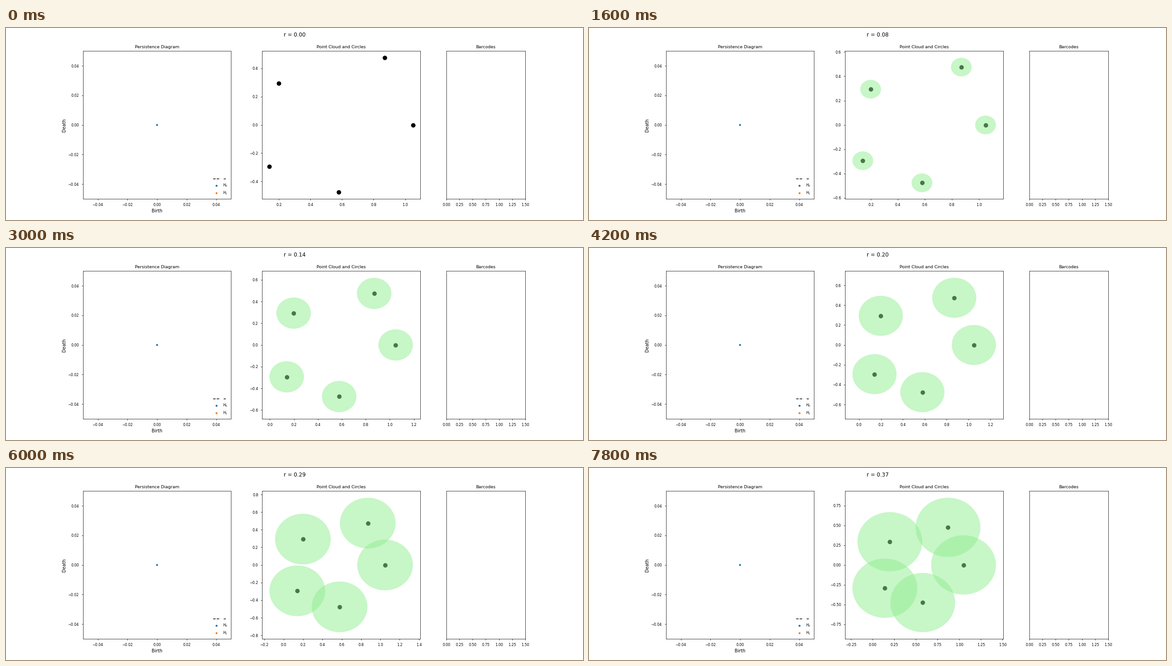
Recreate the animation shown at these times as a matplotlib script. Size 1280 by 427 pixels, loop 8000 ms.

```python
import numpy as np
import matplotlib.pyplot as plt
from matplotlib.animation import FuncAnimation
from matplotlib.patches import Circle

W, H = 1280, 427
DPI = W / 18
FRAMES, INTERVAL = 40, 200
GROWTH = 0.0096  # radius gained per frame
MARGIN = 0.05

plt.rcParams.update({
    "font.family": "DejaVu Sans",
    "axes.titlesize": 9.6,
    "axes.labelsize": 10,
    "xtick.labelsize": 8,
    "ytick.labelsize": 8,
    "xtick.major.pad": 5.6,
    "ytick.major.pad": 5.6,
    "legend.fontsize": 8,
})

# the tiny term keeps the pixel size from truncating downwards
fig = plt.figure(figsize=((W + 1e-6) / DPI, (H + 1e-6) / DPI), dpi=DPI,
                 facecolor="white")
grid = fig.add_gridspec(1, 3, width_ratios=[2, 2, 1], wspace=0.2,
                        left=0.125, right=0.9, bottom=0.11, top=0.88)
diagram, cloud, bars = (fig.add_subplot(cell) for cell in grid)
heading = fig.suptitle("r = 0.00", fontsize=12)

# persistence diagram
diagram.set_title("Persistence Diagram")
diagram.set(xlabel="Birth", ylabel="Death", xlim=(-0.05, 0.05),
            ylim=(-0.05, 0.05))
diagram.set_aspect("equal", "box")
diagram.plot([], [], "--", c="k", lw=1.5, label=r"$\infty$")
diagram.scatter([0], [0], 20, c="tab:blue", edgecolor="none", label="$H_0$")
diagram.scatter([], [], 20, c="tab:orange", edgecolor="none", label="$H_1$")
diagram.legend(loc="lower right", frameon=False)

# pentagon whose corners are pushed sideways at random
angles = np.arange(5) * 2 * np.pi / 5
shift = np.random.RandomState(0).rand(5)
px = 0.5 * np.cos(angles) + shift
py = 0.5 * np.sin(angles)

cloud.set_title("Point Cloud and Circles")
cloud.scatter(px, py, 100, c="black", linewidths=0, zorder=1)
discs = [cloud.add_patch(Circle(p, 0, fc="lightgreen", ec="none", lw=0,
                                alpha=0.5, zorder=1.5))
         for p in zip(px, py)]

# barcodes
bars.set_title("Barcodes")
bars.set_xlim(0, 1.5)
bars.set_yticks([])


def limits(values, r):
    lo, hi = values.min() - r, values.max() + r
    pad = MARGIN * (hi - lo)
    return lo - pad, hi + pad


def update(i):
    r = GROWTH * i
    heading.set_text(f"r = {r:.2f}")
    for disc in discs:
        disc.set_radius(r)
        disc.set_visible(r > 0)
    cloud.set_xlim(limits(px, r))
    cloud.set_ylim(limits(py, r))
    return [heading, *discs]


anim = FuncAnimation(fig, update, frames=FRAMES, interval=INTERVAL,
                     init_func=lambda: update(0), repeat=True, repeat_delay=0)
plt.show()
```
